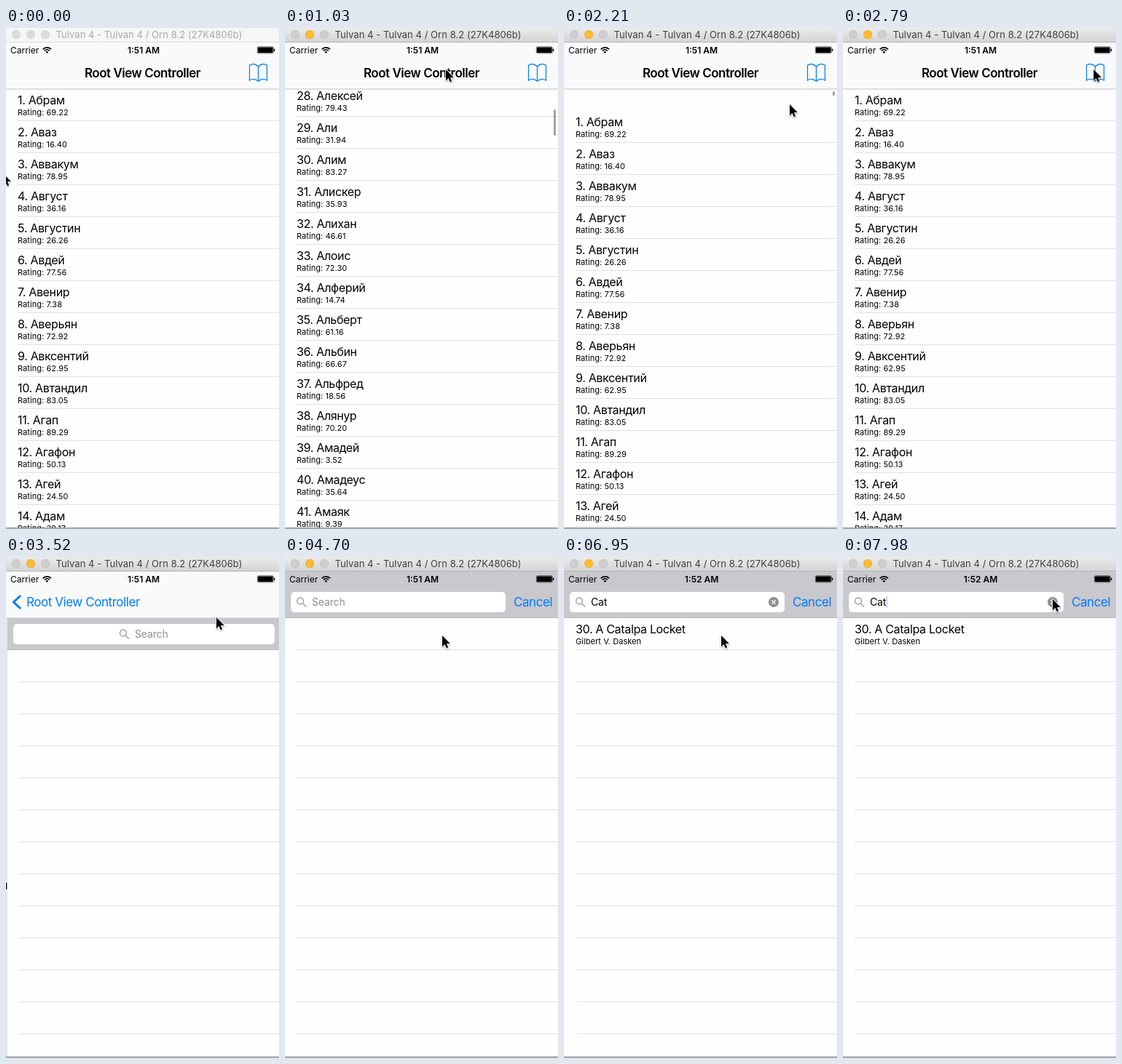
Recreate the animation shown at these times as an HTML page with a canvas. Size 375x689 px, loop 8000 ms.

```html
<!DOCTYPE html>
<html lang="en">
<head>
<meta charset="utf-8">
<title>List and search</title>
<style>
html, body { margin: 0; width: 100%; height: 100%; overflow: hidden; background: #fff; }
canvas { display: block; width: 375px; height: 689px; }
</style>
</head>
<body>
<canvas id="stage" width="375" height="689"></canvas>
<script>
const ctx = document.getElementById('stage').getContext('2d');
const W = 375, H = 689, LOOP = 8000, ROW = 44, TOP = 84, BOTTOM = 687;
const BLUE = '#007aff', GREY = '#8e8e93', BAR = '#c9c8cd', LINE = '#e0e0e2';

const people = `Абрам 69.22,Аваз 16.40,Аввакум 78.95,Август 36.16,Августин 26.26,Авдей 77.56,
Авенир 7.38,Аверьян 72.92,Авксентий 62.95,Автандил 83.05,Агап 89.29,Агафон 50.13,Агей 24.50,
Адам 39.17,Адиль 57.31,Адриан 12.84,Азамат 91.06,Азарий 44.72,Айдар 8.63,Айрат 65.18,Аким 20.97,
Аксён 73.45,Алан 34.09,Албан 52.60,Алдар 87.14,Алевтин 5.76,Александр 48.33,Алексей 79.43,
Али 31.94,Алим 83.27,Алискер 35.93,Алихан 46.61,Алоис 72.30,Алферий 14.74,Альберт 61.16,
Альбин 66.67,Альфред 18.56,Алянур 70.20,Амадей 3.52,Амадеус 35.64,Амаяк 9.39,Амвросий 58.02,
Амин 27.81,Амир 94.15`.split(',').map((s, i) => {
  const [name, rating] = s.trim().split(' ');
  return [`${i + 1}. ${name}`, 'Rating: ' + rating];
});

const books = `3. The Abacus Orchard|Lena Vostrel
5. An Acre for Tobin|Hugh P. Wendle
8. All the Quince Roads|Marta Illing
9. Amber and Chalk|Noel Farrick
11. The Anchor Thief|Sybil T. Corrane
14. Ashes in the Brickyard|Owen Haskett
17. A Basket of Clocks|Petra Lindow
19. Between the Copper Hills and Wicker Boats|Edmund R. Tasker
22. Black Thistle Lane|Ada Morwell
24. The Bracken Hour|Jonas Pellew
26. Brick by Silent Brick|Clara Venning
28. Canisters and Ferns|U. Tolvey
29. Cardigan Weather|Ned Wolmers
30. A Catalpa Locket|Gilbert V. Dasken
71. Hush Her Casement|Marjory P. Ludwen
79. I Saw How the Canal Fog Drifts|Tilda Orvane
150. Slow Marble Cactus|Ivo Drusk
155. A Sunken Plum-Cake|Winifred Scorle`.split('\n').map(s => s.split('|'));

// Bursts of evenly spaced picture changes: start, end, count.
const bursts = [[0, 0, 1], [150, 1180, 8], [1330, 2360, 8], [2500, 3520, 8], [3670, 3820, 2],
  [4110, 4110, 1], [4410, 4700, 3], [5000, 5000, 1], [5300, 5450, 2], [5900, 5900, 1],
  [6350, 6350, 1], [6800, 7100, 3], [7400, 7980, 5]];
const ticks = bursts.flatMap(([a, b, n]) =>
  Array.from({ length: n }, (_, i) => n < 2 ? a : Math.round((a + (b - a) * i / (n - 1)) / 10) * 10));

const scrollKeys = [[150, 0], [300, 70], [600, 560], [890, 1050], [1030, 1194], [1180, 1250],
  [1330, 1195], [1620, 660], [1910, 170], [2060, 8], [2210, -30], [2360, -9], [2500, 0]];
const mouseKeys = [[0, -4, 200], [300, 60, 180], [740, 190, 92], [1030, 221, 57], [1180, 252, 86],
  [1480, 304, 104], [2210, 310, 105], [2500, 322, 88], [2800, 345, 56], [3090, 346, 56],
  [3380, 304, 76], [3520, 289, 83], [3670, 240, 102], [3820, 216, 113], [4109, 216, 113],
  [4110, 216, 108], [7540, 216, 108], [7690, 246, 90], [7840, 283, 62], [7980, 288, 58]];
const focusKeys = [[4300, 0], [4410, .35], [4560, .88], [4700, 1]];

const lerp = (a, b, p) => a + (b - a) * p;

function at(keys, t) {
  let i = keys.findIndex(k => k[0] > t);
  if (i < 0) return keys[keys.length - 1].slice(1);
  if (i === 0) return keys[0].slice(1);
  const a = keys[i - 1], b = keys[i], p = (t - a[0]) / (b[0] - a[0]);
  return a.slice(1).map((v, j) => lerp(v, b[j + 1], p));
}

function box(x, y, w, h, color, r = 0) {
  ctx.fillStyle = color;
  ctx.beginPath();
  ctx.roundRect(x, y, w, h, r);
  ctx.fill();
}

function disc(x, y, r, color) {
  ctx.fillStyle = color;
  ctx.beginPath();
  ctx.arc(x, y, r, 0, 7);
  ctx.fill();
}

function stroke(color, width, path) {
  ctx.strokeStyle = color;
  ctx.lineWidth = width;
  ctx.beginPath();
  path();
  ctx.stroke();
}

function text(s, x, y, size, color = '#000', track = 0, weight = 400, align = 'left') {
  ctx.font = `${weight} ${size}px Inter, Roboto, sans-serif`;
  ctx.letterSpacing = track + 'px';
  ctx.textAlign = align;
  ctx.fillStyle = color;
  ctx.fillText(s, x, y);
  return ctx.measureText(s).width;
}

function faded(alpha, draw) {
  if (alpha <= 0) return;
  ctx.save();
  ctx.globalAlpha *= Math.min(1, alpha);
  draw();
  ctx.restore();
}

function clipped(y0, y1, draw) {
  ctx.save();
  ctx.beginPath();
  ctx.rect(0, y0, W, y1 - y0);
  ctx.clip();
  draw();
  ctx.restore();
}

function table(items, top) {
  for (let i = Math.max(0, Math.floor((TOP - top) / ROW)); top + i * ROW < BOTTOM; i++) {
    const y = top + i * ROW;
    if (items[i]) {
      text(items[i][0], 16, y + 21, 16, '#000', -.33);
      text(items[i][1], 16, y + 36, 11, '#000', .06);
    }
    box(16, y + 43, W - 16, 1, LINE);
  }
}

function rootList(t) {
  const [off] = at(scrollKeys, t);
  table(people, Math.round(TOP - off));
  const alpha = t < 150 ? 0 : t < 2500 ? 1 : 1 - (t - 2400) / 350;
  faded(alpha, () =>
    box(369, 87 + Math.max(0, off) / 26900 * 564, 3, 36 + Math.min(0, off), 'rgba(0,0,0,.36)', 1.5));
}

function bookIcon() {
  stroke(BLUE, 1.2, () => {
    for (const s of [-1, 1]) {
      ctx.moveTo(346.5, 53.5);
      ctx.bezierCurveTo(346.5 + s * 3, 49, 346.5 + s * 9, 48.5, 346.5 + s * 12, 51.5);
      ctx.lineTo(346.5 + s * 12, 72);
      ctx.bezierCurveTo(346.5 + s * 9, 69.5, 346.5 + s * 3, 69.5, 346.5, 73.5);
    }
    ctx.moveTo(346.5, 53.5);
    ctx.lineTo(346.5, 73.5);
  });
}

function navBar(push, focus) {
  box(0, 20, W, 64, '#fafafa');
  box(0, 83.5, W, 1, '#c4c4c6');
  faded(1 - focus, () => {
    ctx.translate(0, -44 * focus);
    const cx = lerp(187.5, 105.5, push);
    faded(1 - push * 1.6, () => text('Root View Controller', cx, 68, 17, '#000', -.48, 600, 'center'));
    faded(1 - push * 1.2, bookIcon);
    faded(push * 1.6 - .6, () => {
      text('Root View Controller', cx, 68, 17, BLUE, -.43, 400, 'center');
      stroke(BLUE, 3, () => {
        ctx.moveTo(20, 53);
        ctx.lineTo(10.5, 62);
        ctx.lineTo(20, 71);
      });
    });
  });
}

function searchBar(focus, query, caret) {
  const y = lerp(84, 20, focus), bottom = lerp(128, 84, focus), fy = bottom - 36;
  box(0, y, W, bottom - y, BAR);
  box(0, bottom - 1, W, 1, '#b7b6bb');
  box(8, fy, lerp(359, 295, focus), 28, '#fff', 5);
  const x = lerp(154, 16, focus);
  stroke(GREY, 1.2, () => {
    ctx.arc(x + 5, fy + 12.5, 4.4, 0, 7);
    ctx.moveTo(x + 8.3, fy + 15.8);
    ctx.lineTo(x + 13, fy + 20.5);
  });
  let w = 0;
  if (query) {
    w = text(query, 37, fy + 18.5, 14, '#000', -.15);
    disc(288, fy + 14, 7, GREY);
    stroke('#fff', 1.3, () => {
      for (const s of [-1, 1]) {
        ctx.moveTo(288 - 2.7, fy + 14 - 2.7 * s);
        ctx.lineTo(288 + 2.7, fy + 14 + 2.7 * s);
      }
    });
  } else {
    text('Search', x + 21, fy + 18.5, 14, GREY, -.15);
  }
  faded(caret, () => box(37 + w, fy + 5, 2, 17, '#426bf2', 1));
  faded(focus, () => text('Cancel', lerp(385, 314, focus), fy + 19.5, 17, BLUE, -.45));
}

function statusBar(t) {
  text('Carrier', 6, 34.5, 12);
  for (const r of [4.7, 7.7]) stroke('#000', 1.7, () => ctx.arc(56.3, 34.6, r, -Math.PI * .76, -Math.PI * .24));
  ctx.fillStyle = '#000';
  ctx.beginPath();
  ctx.moveTo(56.3, 35);
  ctx.arc(56.3, 34.6, 2.4, -Math.PI * .78, -Math.PI * .22);
  ctx.fill();
  text(t < 6950 ? '1:51 AM' : '1:52 AM', 189, 34.5, 12, '#000', 0, 600, 'center');
  stroke('#000', .6, () => ctx.roundRect(345.3, 25.8, 22, 9, 1.6));
  box(346, 26.5, 20.6, 7.6, '#000', 1);
  box(368, 28.5, 1.3, 3.6, '#000', .6);
}

function titleBar(active) {
  const g = ctx.createLinearGradient(0, 0, 0, 20);
  g.addColorStop(0, active ? '#ebebeb' : '#f6f6f6');
  g.addColorStop(1, active ? '#d3d3d3' : '#f6f6f6');
  box(0, 0, W, 20, g);
  box(0, 19, W, 1, active ? '#b5b5b5' : '#dcdcdc');
  [14, 34, 54].forEach((x, i) => {
    const min = active && i === 1;
    disc(x, 9, 6, min ? '#dfa023' : active ? '#bdbdbd' : '#cfcfcf');
    disc(x, 9, 5.4, min ? '#ffbd2e' : active ? '#cecece' : '#dcdcdc');
  });
  text('Tulvan 4 - Tulvan 4 / Orn 8.2 (27K4806b)', 196.5, 14, 13, active ? '#404040' : '#a8a8a8', .05, 400, 'center');
}

function pointer(x, y) {
  ctx.save();
  ctx.translate(x, y);
  const shape = [[0, 0], [0, 15.4], [3.5, 12.1], [5.8, 17.2], [8.2, 16.2], [5.9, 11.2], [10.8, 11]];
  ctx.beginPath();
  shape.forEach(p => ctx.lineTo(...p));
  ctx.closePath();
  ctx.lineJoin = 'round';
  ctx.shadowColor = 'rgba(0,0,0,.35)';
  ctx.shadowBlur = 2;
  ctx.shadowOffsetY = 1;
  ctx.strokeStyle = '#fff';
  ctx.lineWidth = 1.8;
  ctx.stroke();
  ctx.shadowColor = 'transparent';
  ctx.fillStyle = '#000';
  ctx.fill();
  ctx.restore();
}

function caretAlpha(t) {
  if (t < 5000) return 0;
  if (t < 6800) return 1;
  if (t >= 7980) return .3;
  return (t >= 7100 && t < 7400) || (t >= 7690 && t < 7840) ? 1 : 0;
}

function draw(time) {
  const t = ticks.filter(k => k <= time).pop();
  const spring = Math.max(0, t - 3110) / 1000 * 18.26;
  const left = Math.round(W * (1 + spring) * Math.exp(-spring));
  const push = 1 - left / W;
  const [focus] = at(focusKeys, t);
  const query = t < 5300 ? '' : 'Cat'.slice(0, t < 5900 ? 1 : t < 6350 ? 2 : 3);
  const hits = query ? books.filter(b => b[0].toLowerCase().includes(query.toLowerCase())) : [];

  box(0, 0, W, H, '#fefefe');
  if (left > 0) {
    clipped(TOP, BOTTOM, () => {
      ctx.translate(-112 * push, 0);
      rootList(t);
    });
    box(0, TOP, left, BOTTOM - TOP, `rgba(0,0,0,${.1 * push})`);
  }
  navBar(push, focus);
  if (push > 0) {
    clipped(20, BOTTOM, () => {
      ctx.translate(left, 0);
      box(0, TOP, W, BOTTOM - TOP, '#fefefe');
      table(hits, Math.round(lerp(128, 84, focus)));
      searchBar(focus, query, caretAlpha(t));
    });
  }
  statusBar(t);
  titleBar(t >= 300);
  box(0, 687, W, 1, '#8a8a8a');
  box(0, 688, W, 1, '#b9b9b9');
  pointer(...at(mouseKeys, t));
}

const start = performance.now();
function frame() {
  draw((performance.now() - start) % LOOP);
  requestAnimationFrame(frame);
}
frame();
</script>
</body>
</html>
```
